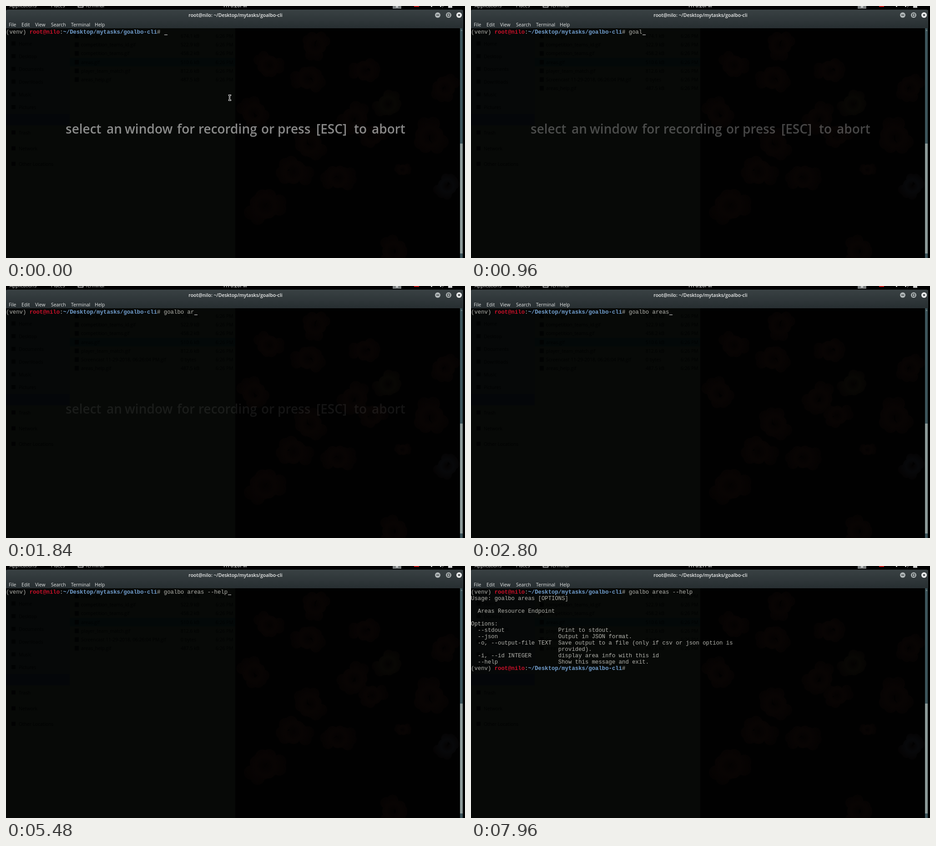
An HTML page with a canvas for the animation above (8 s loop, 1009 by 555 pixels).

```html
<!DOCTYPE html>
<html lang="en">
<head>
<meta charset="utf-8">
<title>Terminal</title>
<style>
html, body { margin: 0; width: 100%; height: 100%; overflow: hidden; background: #000; }
canvas { display: block; }
</style>
</head>
<body>
<canvas id="stage" width="1009" height="555"></canvas>
<script>
const ctx = document.getElementById('stage').getContext('2d');
const LOOP = 8000, CELL = 7.38, LINE = 14;
const SANS = '"Open Sans", "Noto Sans", sans-serif';
const MONO = '12.3px "Liberation Mono", monospace';
const GREY = '#b4b4ae', RED = '#cc1029', BLUE = '#729fcf';

const USER = 'root@nilo', PATH = '~/Desktop/mytasks/goalbo-cli';
const COMMAND = 'goalbo areas --help';
const KEYS = [480, 620, 760, 900, 1060, 1200, 1400, 1600, 1760, 1960,
              2120, 2360, 3300, 4240, 4520, 4800, 4960, 5120, 5320];
const ENTER = 5720, OUTPUT = 6360, MINUTE = 7000, BLINK = 600;
const HELP = [
  'Usage: goalbo areas [OPTIONS]',
  '',
  '  Areas Resource Endpoint',
  '',
  'Options:',
  '  --stdout                Print to stdout.',
  '  --json                  Output in JSON format.',
  '  -o, --output-file TEXT  Save output to a file (only if csv or json option is',
  '                          provided).',
  '  -i, --id INTEGER        display area info with this id',
  '  --help                  Show this message and exit.'
];

const PLACES = [['Home', 83], ['Desktop', 111], ['Documents', 139], ['Downloads', 167],
  ['Music', 195], ['Pictures', 223], ['Trash', 279], ['Network', 314], ['Other Locations', 348]];
const FILES = [['teams.gif', '674.1 kB'], ['competition_teams_id.gif', '522.9 kB'],
  ['competition_teams.gif', '458.2 kB'], ['areas.gif', '510.6 kB'],
  ['player_team_match.gif', '812.6 kB'], ['areas_help.gif', '487.5 kB']];
const NEW_FILE = ['Screencast 11-29-2018, 06:26:04 PM.gif', '0 bytes'];

// x, y, radius of the dim blossoms on the wallpaper
const FLOWERS = [[665, 160, 42], [790, 142, 38], [840, 216, 38], [765, 248, 44],
  [932, 288, 50], [668, 304, 44], [632, 365, 46], [730, 378, 42], [570, 440, 52],
  [970, 396, 34], [852, 540, 42], [545, 236, 42], [578, 130, 38], [872, 360, 20],
  [805, 285, 36], [965, 180, 38], [680, 86, 40]];

const OVERLAY = [['select', 131], ['an', 221], ['window', 261], ['for', 376], ['recording', 423],
  ['or', 561], ['press', 597], ['[ESC]', 682], ['to', 765], ['abort', 804]];

function rect(x, y, w, h, color) {
  ctx.fillStyle = color;
  ctx.fillRect(x, y, w, h);
}

function disc(x, y, r, color) {
  ctx.fillStyle = color;
  ctx.beginPath();
  ctx.arc(x, y, r, 0, Math.PI * 2);
  ctx.fill();
}

function stroke(points, color, width = 1) {
  ctx.strokeStyle = color;
  ctx.lineWidth = width;
  ctx.beginPath();
  points.forEach(([x, y], i) => i ? ctx.lineTo(x, y) : ctx.moveTo(x, y));
  ctx.stroke();
}

function label(str, x, y, font, color, align = 'left') {
  ctx.font = font;
  ctx.fillStyle = color;
  ctx.textAlign = align;
  ctx.fillText(str, x, y);
}

const baseline = row => 61 + row * LINE;

function mono(str, col, row, color = GREY, weight = '') {
  label(str, col * CELL, baseline(row), weight + ' ' + MONO, color);
}

// ragged petals of uneven length, fading towards the rim
function flower([x, y, r], i) {
  const g = ctx.createRadialGradient(x, y, 0, x, y, r);
  g.addColorStop(0, '#040202');
  g.addColorStop(.4, i === 9 ? '#07080a' : i === 2 ? '#080704' : '#080403');
  g.addColorStop(1, '#040202');
  for (let p = 0; p < 11; p++) {
    const a = p * 2.4 + i, reach = r * (.5 + .2 * Math.sin(p * 5 + i * 3));
    disc(x + Math.cos(a) * reach, y + Math.sin(a) * reach * .85, r * .3, g);
  }
}

function wallpaper(t) {
  rect(0, 49, 1005, 506, '#010101');
  FLOWERS.forEach(flower);
  rect(0, 49, 504, 506, '#070907');
  rect(0, 49, 140, 214, '#060808');
  rect(0, 238, 140, 25, '#040609');
  rect(140, 114, 364, 19, '#030808');

  const font = '10.3px ' + SANS, ink = '#010202';
  for (const [name, y] of PLACES) {
    rect(12, y - 5, 9, 9, ink);
    label(name, 28, y + 4, font, ink);
  }
  const rows = t < KEYS[0] ? FILES : [...FILES.slice(0, 5), NEW_FILE, FILES[5]];
  rows.forEach(([name, size], i) => {
    const y = 66 + i * 19.2;
    rect(151, y - 5, 9, 10, ink);
    label(name, 165, y + 4, font, ink);
    label(size, 384, y + 4, font, ink);
    label('6:26 PM', 461, y + 4, font, ink);
  });
}

function panel(t) {
  rect(0, 0, 1009, 9, '#000');
  const font = '10.4px ' + SANS, ink = '#d0d0d0';
  label('Applications', 8, 2.5, font, ink);
  label('Places', 99, 2.5, font, ink);
  label('Terminal', 174, 2.5, font, ink);
  label(t < MINUTE ? 'Fri 6:26PM' : 'Fri 6:27PM', 504, 2.5, '600 ' + font, ink, 'center');
  stroke([[158.5, 0], [158.5, 2.5], [169.5, 2.5], [169.5, 0]], ink, 1.5);
  rect(850, 0, 19, 6, '#777b7b');
  rect(857, 1, 5, 2, '#eee');
  rect(897, 0, 11, 2, '#d01010');
  rect(934, 0, 3, 2, ink);
  rect(954, 0, 3, 2, ink);
  stroke([[959, 3], [961.5, 0]], ink);
  rect(972, 0, 9, 4, ink);
}

function chrome() {
  const g = ctx.createLinearGradient(0, 8, 0, 49);
  g.addColorStop(0, '#394143');
  g.addColorStop(1, '#272e31');
  ctx.fillStyle = g;
  ctx.beginPath();
  ctx.roundRect(0, 8, 1005, 41, [4, 4, 0, 0]);
  ctx.fill();

  label(USER + ': ' + PATH, 504.5, 24, '600 10.5px ' + SANS, '#eeeeee', 'center');
  [['File', 6], ['Edit', 34], ['View', 64], ['Search', 99], ['Terminal', 143], ['Help', 195]]
    .forEach(([name, x]) => label(name, x, 45, '10.4px ' + SANS, '#e4e6e6'));

  const dark = '#252b2d';
  disc(949, 20, 6, '#aeb4b5');
  rect(946, 19.3, 6, 1.5, dark);
  disc(973, 20, 6, '#aeb4b5');
  ctx.strokeStyle = dark;
  ctx.lineWidth = 1.2;
  ctx.strokeRect(970.5, 17.5, 5, 5);
  disc(996, 20, 6, '#f4f5f5');
  stroke([[993.7, 17.7], [998.3, 22.3]], dark, 1.4);
  stroke([[998.3, 17.7], [993.7, 22.3]], dark, 1.4);

  rect(998, 49, 6, 506, '#3c545a');
  rect(998, 303, 6, 242, '#8b9998');
  stroke([[1000, 55], [1001.5, 53], [1003, 55]], '#9aa5a5');
  rect(1004, 49, 5, 506, '#000');
}

function prompt(row) {
  mono('(venv)', 0, row);
  mono(USER, 7, row, RED, 'bold');
  mono(':', 16, row);
  mono(PATH, 17, row, BLUE, 'bold');
  mono('#', 45, row);
}

function terminal(t) {
  const typed = KEYS.filter(k => k <= t).length;
  prompt(0);
  mono(COMMAND.slice(0, typed), 47, 0);

  let col = 47 + typed, row = 0;
  if (t >= ENTER) { col = 0; row = 1; }
  if (t >= OUTPUT) {
    HELP.forEach((text, i) => mono(text, 0, i + 1));
    row = HELP.length + 1;
    prompt(row);
    col = 47;
  }

  // every key press restarts the blink
  const lastKey = t >= ENTER ? ENTER : typed ? KEYS[typed - 1] : 0;
  if (Math.floor((t - lastKey) / BLINK) % 2 === 0) {
    rect(Math.round(col * CELL) + 1, baseline(row) + 2, 7, 1, '#e8e8e8');
  }
}

// white I-beam with a dark core
function pointer() {
  for (const [color, grow] of [['#e0e0e0', 1], ['#000', 0]]) {
    const bar = (x, y, w, h) => rect(x - grow, y - grow, w + 2 * grow, h + 2 * grow, color);
    bar(490, 196, 4, 1);
    bar(491, 196, 1, 12);
    bar(490, 207, 4, 1);
  }
}

function overlay(t) {
  const fade = Math.max(0, 1 - t / 2400);
  if (!fade) return;
  ctx.globalAlpha = .53 * fade ** 1.3;
  for (const [word, x] of OVERLAY) label(word, x, 281, '600 28px ' + SANS, '#fff');
  ctx.globalAlpha = 1;
}

function draw() {
  const t = performance.now() % LOOP;
  wallpaper(t);
  panel(t);
  chrome();
  terminal(t);
  if (t < KEYS[0]) pointer();
  overlay(t);
  requestAnimationFrame(draw);
}
draw();
</script>
</body>
</html>
```
